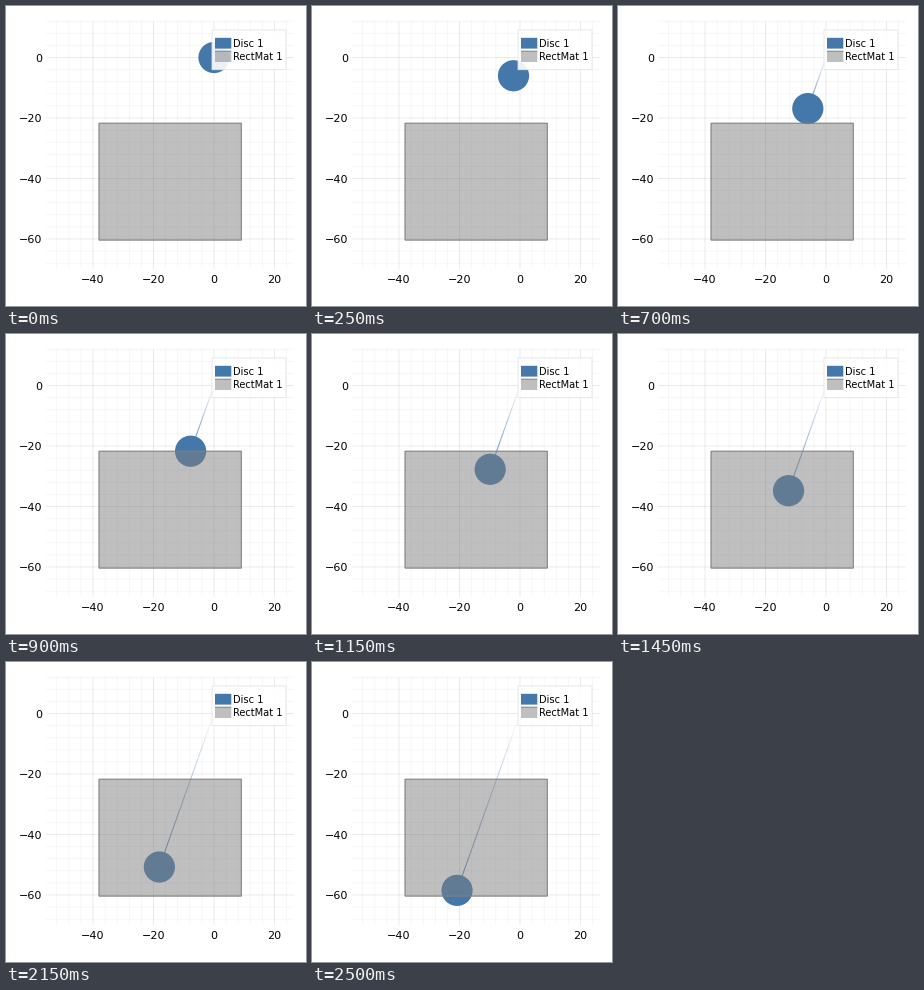
A matplotlib script for the animation above (2.55 s loop, 300 by 300 pixels).

```python
import numpy as np
import matplotlib
import matplotlib.pyplot as plt
from matplotlib.animation import FuncAnimation
from matplotlib.collections import LineCollection
from matplotlib.colors import to_rgb
from matplotlib.patches import Circle, Rectangle

matplotlib.rcParams["font.family"] = "DejaVu Sans"
matplotlib.rcParams["path.snap"] = False

SIZE, DPI = 300, 100
PX = 72 / DPI                      # points per pixel
FRAMES, INTERVAL = 51, 50
SCALE = 3.025                      # pixels per data unit
ORIGIN = np.array([208.0, 51.5])   # pixel position of (0, 0)
LEFT, RIGHT, TOP, BOTTOM = 40, 288, 15, 263

BLUE, GRAY = "#4477AA", "#808080"
MAT = (93, 117.2, 142.3, 116.9)    # x, y, width, height
SPEED, DRAG, ENTRY = 3.65, 0.011, 18
SLOPE = -0.356                     # sideways drift per pixel of descent

fig = plt.figure(figsize=(SIZE / DPI, SIZE / DPI), dpi=DPI, facecolor="white")
ax = fig.add_axes([0, 0, 1, 1])
ax.set_xlim(0, SIZE)
ax.set_ylim(SIZE, 0)
ax.axis("off")


def position(step):
    """Constant speed until the mat, then a steady slowdown."""
    step = np.asarray(step, dtype=float)
    on_mat = np.maximum(step - ENTRY, 0)
    drop = SPEED * step - DRAG * on_mat ** 2 / 2
    return np.stack([ORIGIN[0] + SLOPE * drop, ORIGIN[1] + drop], axis=-1)


def box(x, y, w, h, z, **style):
    return ax.add_patch(Rectangle((x, y), w, h, zorder=z, **style))


def line(xs, ys, alpha, width, z, color="black"):
    ax.plot(xs, ys, color=color, alpha=alpha, lw=width * PX, zorder=z,
            solid_capstyle="butt")


def label(x, y, text, size, **align):
    ax.text(x, y, text, fontsize=size * PX, color="black", zorder=9, **align)


def draw_grid():
    for value in range(-68, 28, 4):
        major = value % 20 == 0
        alpha, width = (0.1, 0.8) if major else (0.05, 0.7)
        x = ORIGIN[0] + SCALE * value
        y = ORIGIN[1] - SCALE * value
        if LEFT <= x <= RIGHT:
            line([x, x], [TOP, BOTTOM], alpha, width, 1)
        if TOP <= y <= BOTTOM:
            line([LEFT, RIGHT], [y, y], alpha, width, 1)


def draw_ticks():
    for value in (-40, -20, 0, 20):
        label(ORIGIN[0] + SCALE * value, 276.7, str(value).replace("-", "\u2212"),
              11.1, ha="center", va="baseline")
    for value in (0, -20, -40, -60):
        label(36.6, ORIGIN[1] - SCALE * value + 4.1,
              str(value).replace("-", "\u2212"), 11.1, ha="right", va="baseline")


def draw_legend():
    box(206, 24, 74, 39.7, 6, fc="white", ec="none", alpha=0.9)
    box(206, 24, 74, 39.7, 7, fc="none", ec="#E2E2E2", lw=0.8 * PX)
    box(209, 31.8, 16.3, 10.8, 8, fc=BLUE, ec="none")
    box(209, 45.2, 16.3, 10.8, 8, fc=GRAY, ec="none", alpha=0.5)
    line([209, 225.3], [45.2, 45.2], 1, 1, 8, GRAY)
    label(226.9, 41.1, "Disc 1", 9.9, ha="left", va="baseline")
    label(226.9, 54.4, "RectMat 1", 9.9, ha="left", va="baseline")


draw_grid()
draw_ticks()
draw_legend()
box(*MAT, 4, fc=GRAY, ec="none", alpha=0.5)
box(*MAT, 5, fc="none", ec=GRAY, lw=1.1 * PX)

trail = LineCollection([], linewidths=1.0 * PX, zorder=2, capstyle="butt")
ax.add_collection(trail, autolim=False)
disc = ax.add_patch(Circle(ORIGIN, 15.6, fc=BLUE, ec="none", zorder=3))


def update(frame):
    points = position(np.arange(frame + 1))
    disc.center = tuple(points[-1])
    trail.set_segments(list(np.stack([points[:-1], points[1:]], axis=1)))
    trail.set_color([(*to_rgb(BLUE), (i + 0.5) / frame) for i in range(frame)])
    return trail, disc


anim = FuncAnimation(fig, update, frames=FRAMES, interval=INTERVAL,
                     init_func=lambda: update(0), repeat=True, repeat_delay=0)
plt.show()
```
